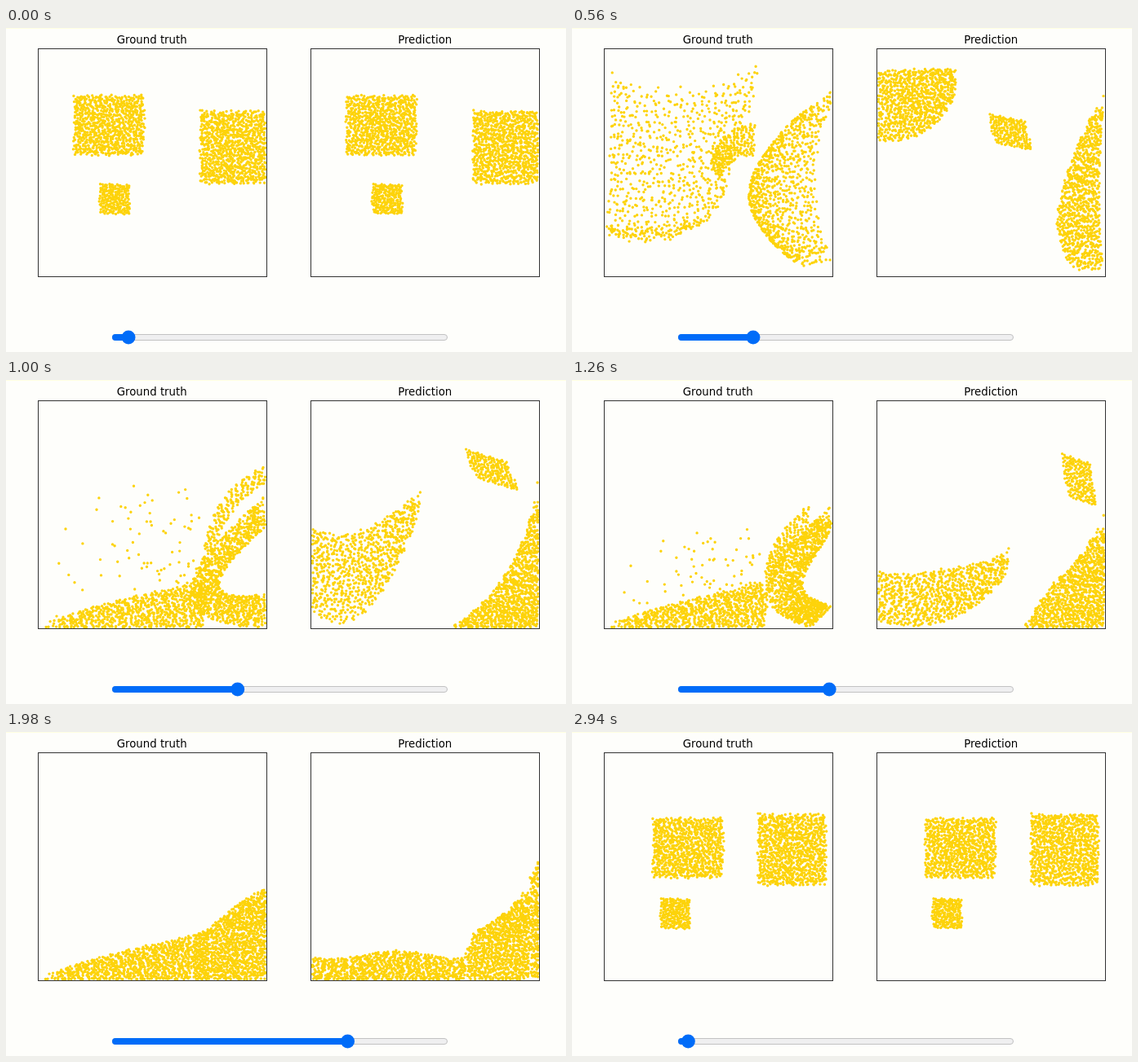
An HTML page for the animation above (2.96 s loop, 686 by 398 pixels).

```html
<!DOCTYPE html>
<html lang="en">
<head>
<meta charset="utf-8">
<title>Particle simulation</title>
<style>
  html, body { margin: 0; width: 100%; height: 100%; overflow: hidden; background: #fefefb; }
  svg { display: block; }
  text { font: 13.3px "DejaVu Sans", sans-serif; text-anchor: middle; fill: #000; }
  .dots { fill: none; stroke: #fdd30a; stroke-width: 3.4; stroke-linecap: round; }
  .frame { fill: none; stroke: #333; }
</style>
</head>
<body>
<svg width="686" height="398" viewBox="0 0 686 398">
  <rect width="686" height="1" fill="#ffffe2"/>
  <text x="178.7" y="18.5">Ground truth</text>
  <text x="513.2" y="18.5">Prediction</text>
  <g transform="translate(40 26)">
    <path id="truth" class="dots"/>
    <rect class="frame" x="-.5" y="-.5" width="280" height="280"/>
  </g>
  <g transform="translate(374 26)">
    <path id="prediction" class="dots"/>
    <rect class="frame" x="-.5" y="-.5" width="280" height="280"/>
  </g>
  <rect x="130.5" y="376.5" width="410" height="7" rx="3.5" fill="#efeff0" stroke="#c2c2c2"/>
  <rect id="fill" x="130" y="376" height="8" rx="4" fill="#006cf8"/>
  <circle id="thumb" cy="380" r="8.5" fill="#006cf8"/>
</svg>
<script>
const LOOP = 2960, WALL = 279, FLOOR = 279, RESTART = -1.3, LAST = 62, ROWS = 48;

let seed = 7;
const random = () => (seed = (seed * 16807) % 2147483647) / 2147483647;
const clamp = (v, lo, hi) => Math.max(lo, Math.min(hi, v));
const mix = (a, b, t) => a + (b - a) * t;
const ease = (lo, hi, x) => { const t = clamp((x - lo) / (hi - lo), 0, 1); return t * t * (3 - 2 * t); };

// A shape fills the space between two edges, each a function of t from 0 to 1.
function shape(a, b, extra = {}) {
  const rows = Array.from({ length: ROWS + 1 }, (_, i) => [...a(i / ROWS), ...b(i / ROWS)]);
  const width = r => Math.hypot(r[2] - r[0], r[3] - r[1]);
  const total = [0];
  for (let i = 0; i < ROWS; i++) {
    const p = rows[i], q = rows[i + 1];
    const length = Math.hypot(q[0] + q[2] - p[0] - p[2], q[1] + q[3] - p[1] - p[3]) / 2;
    total.push(total[i] + length * (width(p) + width(q)) / 2 + .001);
  }
  return { rows, total, grade: 1, spray: 0, ...extra };
}

const bezier = (p, q, r) => t => [0, 1].map(k => mix(mix(p[k], q[k], t), mix(q[k], r[k], t), t));
const between = (a, b, extra) => shape(bezier(...a), bezier(...b), extra);
const toWall = (...a) => between(a, a.map(p => [WALL, p[1]]));
const block = (x, y, w, h) => shape(t => [x + w * t, y], t => [x + w * t, y + h]);
const stack = (x, y, w, h) => shape(t => [x, y + h * t], t => [x + w, y + h * t]);
const heap = (from, to, height, extra) => shape(
  t => [mix(from, to, t), FLOOR - height(mix(from, to, t))], t => [mix(from, to, t), FLOOR], extra);

// The same heap, but filled in level layers from its top down.
function layers(from, to, height) {
  const level = t => mix(FLOOR - height(to), FLOOR, t);
  const edge = y => { let x = from; while (x < to && height(x) < FLOOR - y) x++; return x; };
  return shape(t => [edge(level(t)), level(t)], t => [to, level(t)]);
}

// A small block in free flight, drawn out and slanted as it goes.
function toss(step, speed) {
  const x = 93 + speed * step, y = 184 - 9.6 * step + .23 * step * step;
  const w = 38 + .7 * step, slant = .35 * Math.max(0, step);
  const edge = side => t => [x + w * (.5 - t) + side * slant, y + side * 19 + slant * (1 - 2 * t)];
  return shape(edge(-1), edge(1));
}
const flight = (speed, ...steps) => [RESTART, 0, ...steps].map(s => [s, toss(s, speed)]);

const largeOpening = [[RESTART, block(58, 79, 88, 75)], [0, block(42, 56, 88, 75)], [4, block(1, 1, 88, 76)]];
const tallOpening = [[RESTART, stack(187, 74, 85, 89)], [0, stack(197, 75, 82, 91)]];

const ramp = rise => x => 58 * (x / 200) ** .72 + rise * ease(185, 275, x);
const swell = crest => x => 32 + 5 * Math.cos((x - 105) / 25) + 32 * ease(184, 200, x)
  + Math.max(0, x - 200) * .4 + crest * (Math.max(0, x - 200) / 79) ** 4;

// Each body: particle count, then [step, shape] keys.
const truth = [
  { count: 850, keys: [...largeOpening,
    [8, between([[2, 8], [50, 47], [137, 5]], [[3, 150], [54, 203], [128, 75]])],
    [16, between([[14, 45], [80, 105], [232, 34]], [[0, 310], [100, 335], [172, 270]], { grade: .75 })],
    [22, heap(0, 205, ramp(0), { spray: .09 })],
    [34, heap(0, 189, ramp(62))],
    [43, heap(0, 189, ramp(38))]] },
  { count: 940, keys: [...tallOpening,
    [8, between([[275, 50], [98, 148], [277, 246]], [[279, 54], [249, 146], [279, 240]], { grade: 1.4 })],
    [16, between([[280, 58], [97, 213], [215, 279]], [[282, 85], [222, 188], [285, 279]], { grade: 2 })],
    [22, between([[275, 118], [93, 275], [279, 279]], [[279, 155], [165, 254], [279, 236]])],
    [34, layers(209, WALL, ramp(62))],
    [43, layers(209, WALL, ramp(38))]] },
  { count: 190, keys: [...flight(5.1, 8),
    [16, between([[225, 82], [150, 86], [154, 190]], [[212, 122], [170, 120], [168, 195]])],
    [22, between([[279, 78], [205, 108], [200, 205]], [[279, 100], [222, 132], [207, 212]])],
    [34, heap(209, 189, ramp(62))],
    [43, heap(209, 189, ramp(38))]] }
];

const prediction = [
  { count: 850, keys: [...largeOpening,
    [8, between([[0, 0], [45, 0], [86, 10]], [[0, 80], [70, 78], [88, 40]])],
    [16, between([[0, 74], [70, 70], [115, 46]], [[0, 170], [75, 200], [116, 70]])],
    [22, between([[0, 152], [48, 186], [136, 108]], [[0, 258], [68, 324], [137, 125]])],
    [34, heap(0, 190, swell(0))]] },
  { count: 940, keys: [...tallOpening,
    [8, between([[277, 54], [162, 161], [266, 256]], [[279, 54], [255, 150], [279, 255]])],
    [16, toWall([277, 66], [231, 187], [205, 279])],
    [22, toWall([277, 100], [258, 225], [168, 279])],
    [34, layers(190, WALL, swell(0))],
    [43, layers(190, 268, swell(55))],
    [LAST, layers(190, 268, swell(38))]] },
  { count: 190, keys: [...flight(5.8, 8, 16, 22),
    [34, block(WALL, 82, -15, 105)],
    [43, heap(WALL, 268, swell(55))],
    [LAST, heap(WALL, 268, swell(38))]] }
];

// Spreads a particle evenly over the area of a shape, inside the box.
function place({ rows, total, grade, spray }, p) {
  const area = p.u * total[ROWS];
  let i = 0;
  while (i < ROWS - 1 && total[i + 1] < area) i++;
  const t = (area - total[i]) / (total[i + 1] - total[i]), v = p.v ** grade;
  const [ax, ay, bx, by] = rows[i].map((c, k) => mix(c, rows[i + 1][k], t));
  const lift = p.pick < spray ? 150 * p.far : 0;
  const y = mix(ay, by, v) - lift;
  return [clamp(mix(ax, bx, v), 1.5, WALL - 1.5), clamp(y > FLOOR ? FLOOR - 11 * p.far : y, 1.5, FLOOR - 1.5)];
}

function build(bodies) {
  return bodies.flatMap(({ count, keys }) => Array.from({ length: count }, (_, i) => {
    const spread = k => clamp((.5 + i * k) % 1 * .97 + .015 + (random() - .5) * .04, 0, 1);
    const p = { u: spread(.7548777), v: spread(.5698403), pick: random(), far: random() };
    return { steps: keys.map(k => k[0]), points: keys.map(k => place(k[1], p)) };
  }));
}

// Monotone cubic through the keys, so nothing overshoots the walls.
function along({ steps, points }, axis, step) {
  const end = steps.length - 1;
  if (step >= steps[end]) return points[end][axis];
  let i = 0;
  while (step >= steps[i + 1]) i++;
  const rate = k => (points[k + 1][axis] - points[k][axis]) / (steps[k + 1] - steps[k]);
  const tangent = k => {
    if (k === 0) return rate(0);
    if (k === end) return 0;
    const a = rate(k - 1), b = rate(k);
    return a * b > 0 ? 2 * a * b / (a + b) : 0;
  };
  const h = steps[i + 1] - steps[i], t = (step - steps[i]) / h, s = 1 - t;
  return points[i][axis] * (1 + 2 * t) * s * s + points[i + 1][axis] * t * t * (3 - 2 * t)
    + h * t * s * (tangent(i) * s - tangent(i + 1) * t);
}

const byId = id => document.getElementById(id);
const panels = [[byId("truth"), build(truth)], [byId("prediction"), build(prediction)]];

// Pictures last 20, 100 and 20 ms in turn; the last one already restarts the run.
function stepAt(ms) {
  const r = ms % 140, step = 3 * Math.floor(ms / 140) + (r >= 20) + (r >= 120);
  return step > LAST ? RESTART : step;
}

function draw(step) {
  for (const [path, particles] of panels) {
    path.setAttribute("d", particles.map(p =>
      `M${along(p, 0, step).toFixed(1)} ${along(p, 1, step).toFixed(1)}h0`).join(""));
  }
  const x = Math.min(532, 150 + 5.9 * step + .008 * step * step);
  byId("thumb").setAttribute("cx", x);
  byId("fill").setAttribute("width", x - 130);
}

const start = performance.now();
let shown = null;
function tick() {
  const step = stepAt((performance.now() - start) % LOOP);
  if (step !== shown) draw(shown = step);
  requestAnimationFrame(tick);
}
tick();
</script>
</body>
</html>
```
